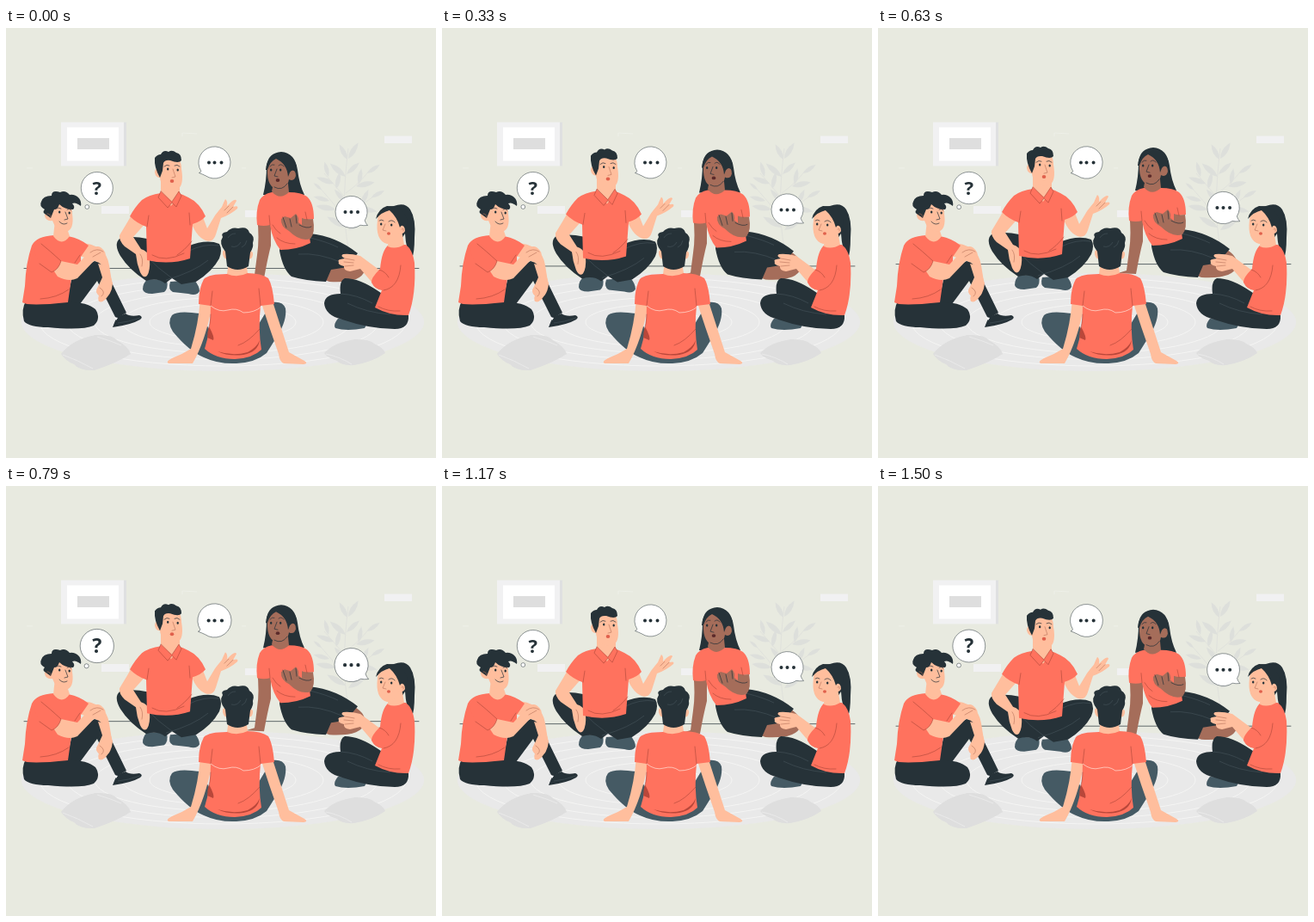
An HTML page that plays this animation: 500x500 px, repeating every 1.54 s.

```html
<!DOCTYPE html>
<html lang="en">
<head>
<meta charset="utf-8">
<title>Group talk</title>
<style>
html, body { margin: 0; height: 100%; overflow: hidden; background: #e8eae0; }
svg { display: block; width: 100%; height: 100%; }
.red { fill: #ff725e; }
.dark { fill: #263238; }
.slate { fill: #455a64; }
.skin { fill: #ffbe9d; }
.brown { fill: #a56d5a; }
.ink { fill: none; stroke: #263238; stroke-width: .7; stroke-linecap: round; stroke-linejoin: round; }
.fine { fill: none; stroke: #b5715a; stroke-width: .6; stroke-linecap: round; }
.fold { fill: none; stroke: #a94538; stroke-width: .6; stroke-linecap: round; }
.seam { fill: none; stroke: #56656d; stroke-width: .4; }
.bubble { fill: #fff; stroke: #263238; stroke-width: .5; }
.ring { fill: none; stroke: #f5f5f4; stroke-width: 1; }
text { font: 700 22px 'Open Sans', sans-serif; text-anchor: middle; }
</style>
</head>
<body>
<svg viewBox="0 0 500 500">
  <!-- room -->
  <path fill="#f1f1f2" d="M64 109.500h73v51H64zM111 207h32v9h-32zM440 125.500h32v8.500h-32zM278 212h15v8h-15z"/>
  <path fill="#dfe0e1" d="M137 109.500h3v51h-3z"/>
  <path fill="#fff" d="M71 115.500h60v39H71z"/>
  <path fill="#dedede" d="M83 128h37v13H83z"/>
  <path fill="none" stroke="#eef0e8" d="M205 126v-4l17 1M24 163h7M274 163h5"/>
  <g id="plant" fill="#dddfdb"><path fill="none" stroke="#dddfdb" stroke-width=".8" d="M398 255Q389 210 398 140M394 197Q380 180 370 169M393 220Q378 200 365 186M395 192Q412 180 422 166M395 222Q414 204 432 193"/></g>

  <!-- rug -->
  <ellipse cx="252" cy="342" rx="234" ry="57" fill="#e9e9e9"/>
  <g id="rings" class="ring"></g>
  <path fill="#dedede" d="M64 379Q77 362 104 357Q124 356 129 363Q143 371 145 379Q130 389 103 398Q86 399 79 391Q69 387 64 379ZM370 378Q382 365 406 362Q423 362 428 367Q439 372 441 378Q427 388 405 392Q390 393 385 387Q374 384 370 378Z"/>
  <path fill="none" stroke="#ececec" stroke-width=".8" d="M66 380Q83 386 101 396M134 369Q123 364 106 359M372 379Q390 383 402 391"/>

  <g id="back">
    <path class="ink" d="M21 279.500H480"/>

    <!-- man with polo shirt -->
    <path class="slate" d="M165 292Q159 296 159 304Q160 309 170 309L184 307Q189 303 187 293ZM219 293Q225 300 225 306Q222 312 212 309L194 307Q188 304 191 295Z"/>
    <path class="dark" d="M164 245Q146 241 132 245Q125 251 133 265Q143 281 163 294Q176 290 185 297L193 291L204 298L221 295Q240 283 248 268Q252 258 248 251Q233 245 211 254Z"/>
    <path class="seam" d="M211 260Q231 250 247 253M186 293Q218 284 235 270M164 266Q176 279 193 291"/>
    <path class="skin" d="M148 214Q140 228 132 241Q131 247 138 254L151 263Q152 274 156 284Q160 292 164 288Q168 282 167 268Q165 259 157 257L148 243L164 225Z"/>
    <path class="skin" d="M214 222Q220 242 232 247Q241 250 244 240L250 221Q261 217 269 210Q271 206 264 208L268 201Q267 198 261 203L257 207Q258 201 255 199Q253 203 251 208Q246 214 243 218L234 233L227 215Z"/>
    <path class="red" d="M180 192Q166 194 158 200Q150 208 144 219Q152 227 163 231L164 270Q190 276 214 268L217 228Q227 225 232 219Q225 203 212 197Q205 193 199 192Z"/>
    <path class="skin" d="M180 175L180 194L192 207L202 193L202 181Z"/>
    <path class="red" d="M180 190L177 197L188 209L193 203L198 208L204 195L201 190L193 202Z"/>
    <path class="fold" d="M180 190L177 197L188 209L193 203L198 208L204 195L201 190L193 202ZM164 231L166 218M214 229L213 215M170 264Q185 273 207 262M216 248Q207 259 199 264"/>
    <path class="skin" d="M179 158Q180 148 193 149Q204 150 204 164C207 181 203 189 194 189C184 188 180 182 179 174Q174 174 173 168Q173 162 178 164Z"/>
    <path class="dark" d="M179 174Q172 162 173 151Q176 147 180 147Q183 141 189 144Q193 141 198 145Q204 146 204 154Q201 158 191 154Q185 153 183 157L182 166Z"/>
    <path class="ink" d="M184 161Q187 158 190 160M196 160Q199 158 202 161"/>
    <path class="fine" d="M194 164L197 173L193 174M156 263Q160 268 158 277M259 207L254 212M264 208L257 215"/>
    <path class="dark" d="M187 164a1.200 1.500 0 1 0 2.400 0a1.200 1.500 0 1 0-2.400 0M198.500 165a1.200 1.500 0 1 0 2.400 0a1.200 1.500 0 1 0-2.400 0"/>
    <ellipse cx="193" cy="178" rx="2.300" ry="2" fill="#e0604c"/>

    <!-- woman with long hair -->
    <path class="dark" d="M303 160Q305 145 320 144Q336 145 339 165Q341 182 347 194L299 194Q303 178 303 160Z"/>
    <path class="brown" d="M292 219Q295 245 292 264L289 287L279 290L300 291Q304 269 308 253L308 219Z"/>
    <path class="brown" d="M361 258Q386 254 406 263Q419 271 417 282Q413 297 376 295L368 292Z"/>
    <path class="dark" d="M319 249L353 239Q384 242 409 262Q401 271 397 278L378 281L372 295Q348 294 332 289Q322 281 318 259Z"/>
    <path class="seam" d="M340 263Q363 261 391 273M354 244Q374 249 386 255"/>
    <path class="red" d="M309 191Q299 193 295 200Q290 213 292 229Q300 231 307 229Q310 247 319 258Q338 258 354 250L350 223L358 222Q358 203 350 196Q343 191 329 191Z"/>
    <path class="brown" d="M344 221Q348 223 357 222Q360 238 354 245Q342 249 329 236Q319 231 320 222L324 219L331 221L337 216Q341 220 340 226L344 229Z"/>
    <path class="brown" d="M311 180L309 190Q318 201 329 191L328 181Z"/>
    <path class="brown" d="M304 164Q303 152 315 151Q328 152 329 165Q337 163 337 172Q335 179 329 176Q327 188 317 188Q303 186 304 164Z"/>
    <path class="dark" d="M302 165Q303 149 318 145Q334 146 338 161L338 168Q333 163 330 168L328 173Q327 158 314 152Q307 155 304 165Z"/>
    <path class="ink" d="M307 161Q309 158 312 159M317 160Q320 157 323 161M315 164L312 172L316 173M312 185Q321 190 327 181M322 220L326 232M330 222L332 231M337 218L338 227M341 229Q350 234 355 231"/>
    <path class="dark" d="M307 165a1.200 1.500 0 1 0 2.400 0a1.200 1.500 0 1 0-2.400 0M318 165a1.200 1.500 0 1 0 2.400 0a1.200 1.500 0 1 0-2.400 0"/>
    <ellipse cx="316" cy="177" rx="2.300" ry="1.900" fill="#5b2a2a"/>
    <path class="fold" d="M307 229L306 218M350 223L348 214M315 244Q323 251 336 251M310 229Q314 236 319 239"/>

    <g class="pulse" data-at="401.500 214">
      <path class="bubble" d="M10.500 15.200A18.500 18.500 0 1 1 15.700 9.800Q16.500 13 19 15.500Q14 16 10.500 15.200Z"/>
      <path class="dark" d="M-9 0a2 2 0 1 0 4 0a2 2 0 1 0-4 0M-2 0a2 2 0 1 0 4 0a2 2 0 1 0-4 0M5.500 0a2 2 0 1 0 4 0a2 2 0 1 0-4 0"/>
    </g>
  </g>

  <!-- man on the left -->
  <path class="skin" d="M82 250Q99 249 109 257Q118 263 120 276L124 301Q122 313 112 318Q106 320 108 311Q103 307 107 301L111 291L106 272L83 264Z"/>
  <path class="dark" d="M70 321L76 293Q88 278 103 271Q113 273 119 288L140 331L128 338L106 294L86 321Z"/>
  <path class="skin" d="M107 274L118 277L124 297Q123 311 112 318Q106 320 108 311Q103 307 107 301L112 290Z"/>
  <path class="dark" d="M24 316Q17 327 21 341Q27 348 49 348Q88 352 102 346Q111 338 104 327Q93 317 63 319ZM124 348Q127 340 129 336L139 332Q144 336 155 334Q160 336 156 339Q146 345 124 348Z"/>
  <path class="seam" d="M130 343Q142 342 156 337"/>
  <path fill="#fff" d="M126 336l4 1-2 3z"/>
  <path class="red" d="M56 241Q35 242 30 253Q23 273 22 300L19 319Q25 324 72 319L76 291Q88 284 87 266L96 253Q87 245 72 242Z"/>
  <path class="skin" d="M52 277L64 271L83 275L98 259Q104 252 110 255Q118 261 115 267Q111 270 103 270L83 291Q73 296 60 289Z"/>
  <path class="red" d="M37 247Q30 260 37 269L53 284Q61 281 64 271L51 255Z"/>
  <path class="fold" d="M41 251Q51 259 64 271Q61 281 53 284L39 274M73 304Q59 314 40 315M86 264L80 273"/>
  <path class="skin" d="M57 224L55 242Q65 255 74 242L71 233Z"/>
  <path class="skin" d="M51 209Q53 199 66 200Q77 202 77 216C79 229 76 237 68 237Q58 236 54 224Q46 225 45 218Q45 213 51 214Z"/>
  <path class="dark" d="M52 221L45 216Q42 214 45 211Q38 207 41 202Q43 195 53 195Q53 188 63 191Q69 188 74 194Q80 193 85 198Q88 202 87 207Q81 202 77 204Q81 208 78 211Q68 211 62 205Q60 211 56 211Z"/>
  <path class="ink" d="M58 210Q61 208 64 210M71 211Q74 209 76 212M69 214L72 222L68 223M62 225Q66 230 71 227"/>
  <path class="fine" d="M48 216Q52 216 52 220M98 261Q106 255 113 260M101 266L110 261M109 302Q117 307 111 312"/>
  <path class="dark" d="M61 214a1.200 1.500 0 1 0 2.400 0a1.200 1.500 0 1 0-2.400 0M72.500 215a1.200 1.500 0 1 0 2.400 0a1.200 1.500 0 1 0-2.400 0"/>

  <!-- woman on the right -->
  <path class="slate" d="M386 338Q380 345 383 349Q396 353 417 349L422 340Z"/>
  <path class="dark" d="M433 306Q411 291 394 291Q387 294 389 309Q371 309 370 320Q371 334 391 339Q423 350 452 350Q469 350 468 334L462 326Z"/>
  <path class="seam" d="M389 309Q408 310 426 320M397 320Q419 331 447 333"/>
  <path class="dark" d="M432 219Q437 207 451 207Q464 202 470 211Q477 222 475 244Q475 261 472 268Q465 259 464 239L456 251Z"/>
  <path class="skin" d="M435 282L412 265Q400 262 392 263Q388 265 394 268Q384 269 387 272Q385 275 393 277Q392 282 400 283L412 280L430 301Q441 305 449 285Z"/>
  <path class="red" d="M445 252Q437 258 435 280Q424 291 425 296Q429 304 437 305L429 325Q447 335 468 334Q477 310 475 273Q473 258 465 252Z"/>
  <path class="fold" d="M434 281Q441 283 445 290M439 305Q457 302 459 276M433 324Q444 330 458 329"/>
  <path class="skin" d="M445 241L444 254Q453 258 463 252L460 235Z"/>
  <path class="skin" d="M432 223Q432 211 446 212Q459 215 458 229Q464 229 464 236Q462 240 457 239Q453 250 443 251Q429 247 432 223Z"/>
  <path class="dark" d="M430 222Q433 210 443 207Q462 207 467 224L465 232Q460 227 458 232Q455 220 446 212Q437 214 430 222Z"/>
  <path class="ink" d="M434 224Q436 222 439 224M445 225Q449 222 452 226"/>
  <path class="fine" d="M441 228L438 235L442 236M460 234Q463 232 462 236M394 268L405 270M393 272L404 273M394 277L404 276"/>
  <path class="dark" d="M435 228a1.200 1.500 0 1 0 2.400 0a1.200 1.500 0 1 0-2.400 0M447 229a1.200 1.500 0 1 0 2.400 0a1.200 1.500 0 1 0-2.400 0"/>
  <ellipse cx="445" cy="239" rx="2" ry="1.700" fill="#e0604c"/>

  <!-- man seen from behind -->
  <path class="slate" d="M226 332Q199 328 193 334Q187 342 194 353Q213 376 230 383Q247 391 268 390Q290 389 303 378L315 359Q327 340 325 326Q322 317 309 319L294 344L236 350Z"/>
  <path class="skin" d="M226 314Q224 344 215 373Q204 380 193 384Q185 388 189 390L217 390Q232 364 240 321ZM296 317Q306 348 317 379Q318 388 323 390L346 391Q352 390 347 387L329 377L309 315Z"/>
  <path class="red" d="M257 286Q236 286 230 292Q224 303 224 321L238 323Q238 351 231 373Q244 385 266 385Q287 384 297 374Q293 350 296 323L312 321Q310 299 305 291Q297 285 280 285Z"/>
  <path class="fold" d="M238 323L240 306M296 323L294 303M234 356Q238 343 238 333M295 350Q282 365 270 369"/>
  <path fill="#b9473a" d="M236 347Q243 360 241 363L234 360ZM246 376Q264 382 281 377Q292 371 295 363Q293 377 276 380Q258 382 246 376Z"/>
  <path fill="none" stroke="#ffd5ca" stroke-width=".8" d="M238 323Q248 331 258 328T276 331Q289 331 297 324"/>
  <path class="skin" d="M259 272L257 286Q269 291 281 285L279 272Z"/>
  <path class="skin" d="M255 258Q250 258 253 266Q255 270 259 268ZM284 259Q289 260 286 267Q283 270 280 267Z"/>
  <path class="dark" d="M255 260Q247 250 252 243Q249 238 257 237Q262 231 270 233Q281 230 283 238Q290 242 287 250Q288 255 284 261L282 277Q269 285 257 277Z"/>
  <path class="seam" d="M262 254Q269 256 273 249M274 255Q279 253 280 247M258 244Q261 239 267 239"/>

  <!-- speech bubbles -->
  <g class="pulse" data-at="105.800 186">
    <circle class="bubble" r="18.500"/><circle class="bubble" cx="-11.500" cy="22" r="2.400"/>
    <text class="dark" y="7.500">?</text>
  </g>
  <g class="pulse" data-at="242.500 156.500">
    <path class="bubble" d="M-15.700 9.800A18.500 18.500 0 1 1-10.500 15.200Q-14 13.500-18 12Q-16 11.500-15.700 9.800Z"/>
    <path class="dark" d="M-8.500 0a2 2 0 1 0 4 0a2 2 0 1 0-4 0M-2 0a2 2 0 1 0 4 0a2 2 0 1 0-4 0M6 0a2 2 0 1 0 4 0a2 2 0 1 0-4 0"/>
  </g>
</svg>
<script>
const LOOP = 1540, PULSE = 616, RISE = 6;
const back = document.getElementById('back');
const bubbles = [...document.querySelectorAll('.pulse')];

const add = (id, tag, attrs) => {
  const el = document.createElementNS('http://www.w3.org/2000/svg', tag);
  for (const key in attrs) el.setAttribute(key, attrs[key]);
  document.getElementById(id).append(el);
};

// leaf: base x, base y, angle, length
[[397, 153, -118, 20], [398, 152, -58, 22], [395, 173, -140, 24], [396, 170, -42, 20],
 [381, 181, -160, 21], [375, 173, -105, 18], [384, 187, -78, 20], [410, 182, -80, 19],
 [407, 184, -12, 22], [420, 169, -35, 18], [376, 201, -165, 19], [367, 188, -140, 12],
 [383, 211, -170, 23], [413, 206, -65, 20], [410, 209, 12, 22], [425, 197, -28, 17],
 [394, 202, -130, 19], [395, 232, -150, 25], [398, 235, -32, 24]].forEach(([x, y, angle, n]) =>
  add('plant', 'path', {
    d: `M0 0Q${n * .45} ${-n * .28} ${n} 0Q${n * .45} ${n * .28} 0 0`,
    transform: `translate(${x} ${y}) rotate(${angle})`
  }));

for (let k = 0; k < 6; k++)
  add('rings', 'ellipse', { cx: 252, cy: 342, rx: 213 - k * 32, ry: 51 - k * 7.500 });

function draw(now) {
  const t = now % LOOP;
  const rise = RISE * (1 - Math.abs(2 * t / LOOP - 1));
  back.setAttribute('transform', `translate(0 ${-rise})`);
  const scale = 1 + .06 * Math.max(0, Math.sin(2 * Math.PI * t / PULSE));
  for (const b of bubbles)
    b.setAttribute('transform', `translate(${b.dataset.at}) scale(${scale})`);
  requestAnimationFrame(draw);
}
draw(performance.now());
</script>
</body>
</html>
```
